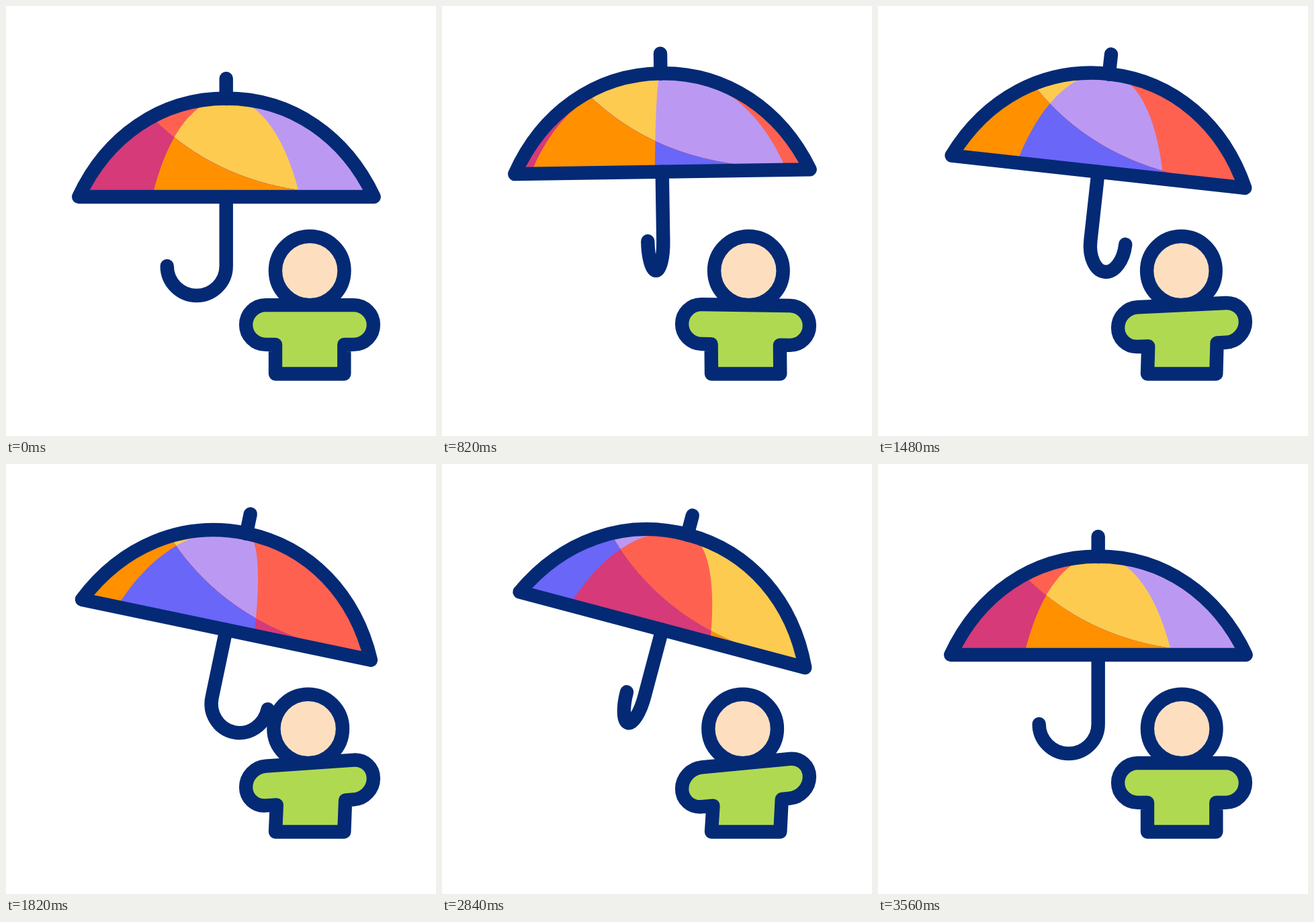
An HTML page with a canvas for the animation above (3620 ms loop, 640 by 640 pixels).

```html
<!DOCTYPE html>
<html lang="en">
<head>
<meta charset="utf-8">
<title>Umbrella</title>
<style>
  html, body { margin: 0; width: 100%; height: 100%; overflow: hidden; background: #fff; }
  canvas { display: block; width: 640px; height: 640px; }
</style>
</head>
<body>
<canvas id="stage" width="640" height="640"></canvas>
<script>
const ctx = document.getElementById('stage').getContext('2d');
const LOOP = 3620, START = 220, SWING = 1180;
const NAVY = '#042a75';
const LIGHT = ['#ff6151', '#fdcb50', '#bb99f2'];
const DARK = ['#d63a78', '#ff9000', '#6a66f8'];

// [time, value] steps
const SPIN = [[220, 0], [480, 12.5], [1160, 53], [1400, 60], [1820, 78.8],
  [2240, 106.5], [2580, 120], [2840, 130.3], [3540, 180]];
const HOOK = [[220, -88], [480, -62], [1160, 15.7], [1795, 88],
  [2240, 34.3], [2840, -27.1], [3540, -88]];

const clamp = (v, a, b) => Math.min(b, Math.max(a, v));
const ease = (t, a, b) => (1 - Math.cos(Math.PI * clamp((t - a) / (b - a), 0, 1))) / 2;

function track(steps, t) {
  if (t <= steps[0][0]) return steps[0][1];
  for (let i = 1; i < steps.length; i++) {
    const [t0, v0] = steps[i - 1], [t1, v1] = steps[i];
    if (t < t1) return v0 + (v1 - v0) * (t - t0) / (t1 - t0);
  }
  return steps[steps.length - 1][1];
}

// Sway in -1..1: full swings, then one settling move
function sway(t, lead = 0) {
  const peak = START + SWING * 2.25;
  if (t < START) return 0;
  if (t > peak) return 1 - ease(t, peak, 3340);
  const u = (t - START) / SWING;
  return Math.sin(2 * Math.PI * (u + lead * Math.min(1, u * 4)));
}

// Canopy coordinates: origin at the middle of its base
function dome(k = 1) {
  ctx.bezierCurveTo(98 * k, -146.5, 178 * k, -89, 220 * k, 0);
}

function canopyPath() {
  ctx.beginPath();
  ctx.moveTo(-219.5, 0);
  ctx.bezierCurveTo(-178, -89, -98, -146.5, 0, -146.5);
  dome();
  ctx.closePath();
}

// Panels of 60 degrees on a turning dome, painted from right to left
function panels(spin, colors) {
  for (let n = 5; n >= -1; n--) {
    const edge = 60 * n + 30 - spin;
    if (edge <= -90) break;
    const k = Math.sin(Math.min(edge, 90) * Math.PI / 180);
    ctx.beginPath();
    ctx.moveTo(-240, 0);
    ctx.lineTo(-240, -160);
    ctx.lineTo(0, -160);
    ctx.lineTo(0, -146.5);
    dome(k);
    ctx.closePath();
    ctx.fillStyle = colors[(n + 1) % 3];
    ctx.fill();
  }
}

function umbrella(t, lift) {
  ctx.save();
  ctx.translate(327.7, 284 - 37.3 * lift);
  ctx.rotate(15.1 * sway(t) * Math.PI / 180);

  ctx.save();
  canopyPath();
  ctx.clip();
  const spin = track(SPIN, t);
  panels(spin, LIGHT);
  ctx.beginPath();
  ctx.moveTo(-118, -126);
  ctx.lineTo(-104, -112);
  ctx.quadraticCurveTo(-18, -29, 107, -10);
  ctx.lineTo(130, 0);
  ctx.lineTo(-230, 0);
  ctx.lineTo(-230, -126);
  ctx.closePath();
  ctx.clip();
  panels(spin, DARK);
  ctx.restore();

  canopyPath();
  ctx.stroke();

  const rx = track(HOOK, t) / 2;
  ctx.beginPath();
  ctx.moveTo(0, -176);
  ctx.lineTo(0, -146);
  ctx.moveTo(0, 0);
  ctx.lineTo(0, 103);
  ctx.ellipse(rx, 103, Math.abs(rx), 44, 0, rx < 0 ? 0 : Math.PI, rx < 0 ? Math.PI : 0, rx > 0);
  ctx.stroke();
  ctx.restore();
}

function person(t, lift) {
  const s = sway(t, 0.015), slope = 0.095 * s, shift = 2.5 * s;

  ctx.beginPath();
  ctx.arc(452.2 + 3 * lift - 7.6 * s, 394, 51.3, 0, 2 * Math.PI);
  ctx.fillStyle = '#fddfbf';
  ctx.fill();
  ctx.stroke();

  // Arms shear with the sway, the hem stays put
  ctx.beginPath();
  ctx.save();
  ctx.transform(1, -slope, 0, 1, 0, slope * 452);
  ctx.moveTo(401 + shift, 504);
  ctx.arc(386.5, 474.5, 29.4, Math.PI / 2, Math.PI * 1.5);
  ctx.arc(517.5, 474.5, 29.4, -Math.PI / 2, Math.PI / 2);
  ctx.lineTo(503.3 + shift, 504);
  ctx.restore();
  ctx.lineTo(503.3, 547.5);
  ctx.lineTo(401, 547.5);
  ctx.closePath();
  ctx.fillStyle = '#b0d952';
  ctx.fill();
  ctx.stroke();
}

function draw(t) {
  ctx.fillStyle = '#fff';
  ctx.fillRect(0, 0, 640, 640);
  ctx.strokeStyle = NAVY;
  ctx.lineWidth = 20.4;
  ctx.lineCap = ctx.lineJoin = 'round';
  const lift = ease(t, START - 10, 490) - ease(t, 3190, 3510);
  umbrella(t, lift);
  person(t, lift);
}

const begin = performance.now();
function tick() {
  draw((performance.now() - begin) % LOOP);
  requestAnimationFrame(tick);
}
tick();
</script>
</body>
</html>
```
